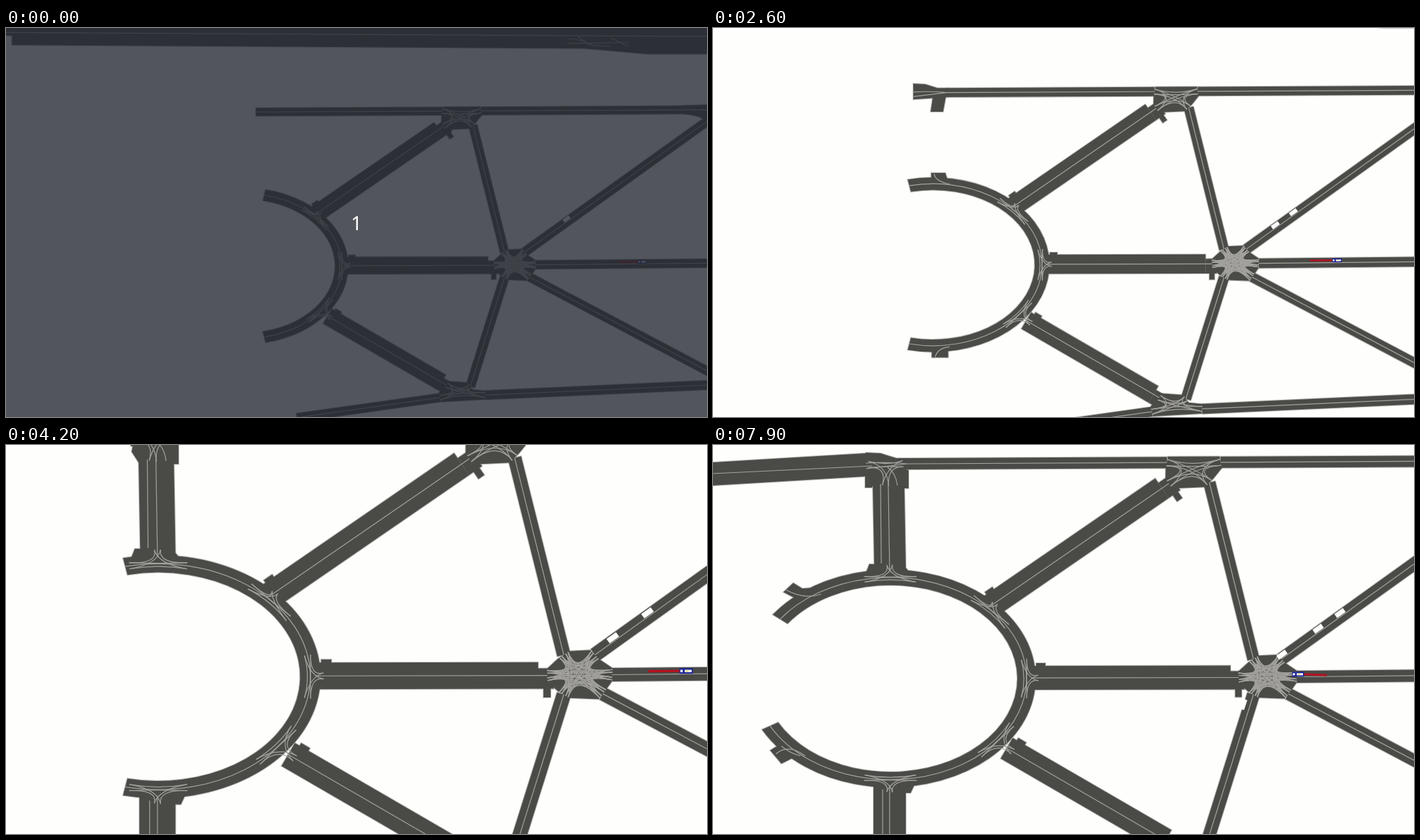
An HTML page with a canvas for the animation above (8000 ms loop, 1004 px wide and 558 px high).

```html
<!DOCTYPE html>
<html lang="en">
<head>
<meta charset="utf-8">
<title>Road map</title>
<style>
  html, body { margin: 0; width: 100%; height: 100%; overflow: hidden; background: #fefefc; }
  canvas, #veil { position: absolute; left: 0; top: 0; width: 1004px; height: 558px; }
  #veil {
    background: rgba(36, 40, 49, .79);
    color: #fff; font: 28px/558px "Noto Sans", "Open Sans", sans-serif; text-align: center;
  }
</style>
</head>
<body>
<canvas id="map"></canvas>
<div id="veil">1</div>
<script>
const W = 1004, H = 558, LOOP = 8000;
const canvas = document.getElementById('map');
const veil = document.getElementById('veil');
const ctx = canvas.getContext('2d');
const dpr = window.devicePixelRatio || 1;
canvas.width = W * dpr;
canvas.height = H * dpr;

const roads = [], lanes = [];
const road = (d, from = 0, to = LOOP) => roads.push({ p: new Path2D(d), from, to });
const lane = (d, from = 0, to = LOOP) => lanes.push({ p: new Path2D(d), from, to });
const rad = d => d * Math.PI / 180;
const passed = (times, t) => times.filter(x => x <= t).length;

// A straight axis; at(s, o) is s along it and o to its right
function axis(x1, y1, x2, y2) {
  const len = Math.hypot(x2 - x1, y2 - y1);
  const ux = (x2 - x1) / len, uy = (y2 - y1) / len;
  return { len, at: (s, o = 0) => [x1 + ux * s - uy * o, y1 + uy * s + ux * o] };
}

function strip(ax, s0, s1, o0, o1) {
  road('M' + [ax.at(s0, o0), ax.at(s1, o0), ax.at(s1, o1), ax.at(s0, o1)].join('L') + 'Z');
}

const centre = (ax, s0, s1) => lane('M' + ax.at(s0) + 'L' + ax.at(s1));

// Both kinds of road return their two mouths
function narrow(x1, y1, x2, y2, w = 17) {
  const ax = axis(x1, y1, x2, y2);
  strip(ax, 0, ax.len, -w / 2, w / 2);
  centre(ax, 0, ax.len);
  return [ax.at(0), ax.at(ax.len)];
}

// Parking strips make these wide, with a step at each end
function wide(x1, y1, x2, y2) {
  const ax = axis(x1, y1, x2, y2), n = ax.len;
  strip(ax, -20, n, -17, 17);
  strip(ax, -13, 0, -21, 0);
  strip(ax, n, n + 20, -9, 17);
  strip(ax, n + 7, n + 16, 0, 28);
  centre(ax, -20, n + 12);
  return [ax.at(-10), ax.at(n + 12)];
}

// Turning lanes from every mouth to every other one
function turns(cx, cy, mouths, from = 0, offsets = [4.5]) {
  const shift = ([x, y], o) => {
    const l = Math.hypot(x - cx, y - cy);
    return [x - (y - cy) / l * o, y + (x - cx) / l * o];
  };
  for (const o of offsets) for (const a of mouths) for (const b of mouths) {
    if (a !== b) lane(`M${shift(a, o)}Q${cx} ${cy} ${shift(b, -o)}`, from);
  }
  return shift;
}

function junction(cx, cy, mouths, offsets) {
  const shift = turns(cx, cy, mouths, 0, offsets);
  const angle = ([x, y]) => Math.atan2(y - cy, x - cx);
  const corners = [...mouths].sort((a, b) => angle(a) - angle(b))
    .flatMap(m => [shift(m, -8.5), shift(m, 8.5)]);
  road('M' + corners.join('L') + 'Z');
}

// The ring: k runs from 0 (inside) to 1 (outside)
const CX = 254, CY = 335;
const radii = k => [182 + 26 * k, 134 + 22 * k];
const onRing = (a, k = .5) =>
  [CX + radii(k)[0] * Math.cos(rad(a)), CY + radii(k)[1] * Math.sin(rad(a))];

function ring(a0, a1, k0 = 0, k1 = 1) {
  const p = new Path2D();
  p.ellipse(CX, CY, ...radii(k1), 0, rad(a0), rad(a1));
  if (k0 !== k1) {
    p.ellipse(CX, CY, ...radii(k0), 0, rad(a1), rad(a0), true);
    p.closePath();
  }
  return p;
}

const ringNode = (a, mouth, from) =>
  turns(...onRing(a), [onRing(a - 11), onRing(a + 11), mouth], from, [4]);

// Motorway at the top
road('M-233-150H1200V-89H1059L934-100-209-107V-126H-233Z');
lane('M-233-132L1200-124');
lane('M899-120Q930-118 948-107L985-104M920-124L945-107M987-121L1021-104M899-110L1024-112');

// Network
const topW = narrow(278, 27, 650, 25.2, 16), topE = narrow(727, 24.8, 1200, 22.4, 16);
const lowW = narrow(360, 638, 645, 598), lowE = narrow(735, 593, 1200, 572, 18);
const upper = wide(412, 221, 643, 62), mid = wide(476, 334, 741, 333.5), lower = wide(438, 445, 648, 567);
const north = narrow(711, 54, 774, 307), south = narrow(774, 358, 706, 575, 18);
const northE = narrow(814, 307, 1200, 30, 18);
const east = narrow(836, 332.5, 1200, 329);
const southE = narrow(824, 357, 1200, 556);
road('M1130 14L1200 12V42L1172 44Q1168 34 1130 31Z');

junction(790, 331, [mid[1], north[1], northE[0], east[0], southE[0], south[0]], [3, 6.5]);
junction(688, 32, [topW[1], topE[0], upper[1], north[0]]);
junction(688, 588, [lowW[1], lowE[0], lower[1], south[1]]);
ringNode(-42, upper[0]);
ringNode(0, mid[0]);
ringNode(38, lower[0]);

// West side, which arrives piece by piece
const THIN = 1200, STUBS = 1800, BLOCKS = 2800, AVENUE = 4300, FORK = 6200, FORK_FULL = 6500, LAST = 7500;
road('M267 484H283V500H267Z', THIN, STUBS);
road('M219 11L240 12 262 19 282 19V35L219 39Z', STUBS);
lane('M219 26Q250 24 278 27M219 34Q245 31 278 27', STUBS);
road('M254 34H277L272 61H250ZM251 171H276L281 186H251ZM252 484H281V501H252Z', STUBS, BLOCKS);
lane('M256 172Q258 186 284 191M258 500Q262 484 284 482', STUBS, BLOCKS);
road('M222 36H280V62H274L276 176 284 186H218L224 171H231L229 60 220 46Z', BLOCKS);
road('M222 484H290L283 499H276V700H230V490Z', BLOCKS);
lane('M240 56L241 170M251 56L253 180M264 58Q262 40 250 32M243 494V700M253 488V700', BLOCKS);
road('M-100 30L0 25 218 12 236 12 262 19 278 36 228 45V61H218V45L0 58-100 63Z', AVENUE);
lane('M-100 47L0 41 228 30', AVENUE);
road('M101 210L106 205 125 214 155 212 150 220 126 223Z', FORK, FORK_FULL);
lane('M105 208Q130 222 155 214', FORK);
road('M101 211L115 198 128 206 155 204 150 218 126 224Z', FORK_FULL);
road('M82 438L95 430 124 440 112 450 98 457Z', LAST);
lane('M90 443Q108 428 132 446M98 432Q110 442 125 446', LAST);
turns(250, 30, [[222, 28], [272, 27], [247, 58]], BLOCKS);
ringNode(-90, [253, 172], BLOCKS);
ringNode(90, [253, 498], BLOCKS);

const ringTop = t => [78, 102.5, 120.7, 144][passed([STUBS, AVENUE, FORK_FULL], t)];
const ringEnd = t => [78, 102.5, 128.5, 152][passed([STUBS, AVENUE, LAST], t)];
const zoom = t => 1.117 ** (passed([1700, BLOCKS, 4000, 4100], t) - 3 - passed([5000], t));

// Down the north-east road, then round the star into the south road
const approach = axis(898, 241, 798, 313), exit = axis(763, 362, 757, 380);
const BEND = 56;
function route(s) {
  if (s < approach.len) return approach.at(s);
  const u = (s - approach.len) / BEND;
  if (u > 1) return exit.at((u - 1) * BEND);
  const mix = (a, b, c) => a * (1 - u) ** 2 + 2 * b * u * (1 - u) + c * u * u;
  return [mix(798, 773, 763), mix(313, 331, 362)];
}

function drawTraffic(t) {
  ctx.fillStyle = '#fff';
  for (let k = 0; k < 4; k++) {
    if (t < 2600 * k - 500) break;
    const sec = Math.max(0, t - 2680 * k) / 1000;
    const s = 11 * sec + 1.65 * sec * sec;
    const [x, y] = route(s), [nx, ny] = route(s + 1);
    ctx.save();
    ctx.translate(x, y);
    ctx.rotate(Math.atan2(ny - y, nx - x));
    ctx.fillRect(-7.5, -3.5, 15, 7);
    ctx.restore();
  }
}

// Steady speed, then braking; the red bar follows and swings over
function drawEgo(t) {
  const sec = t / 1000;
  const x = 1049 - 28.1 * sec + 4.3 * Math.max(0, sec - 6.3) ** 2;
  const bar = -40 + 36 * Math.max(0, sec - 5.88);
  const side = 8.5 * Math.sign(bar);
  ctx.save();
  ctx.translate(x, 328 - (x - 909) * .012);
  ctx.strokeStyle = '#b5101f';
  ctx.lineWidth = 3;
  ctx.beginPath();
  ctx.moveTo(side, 0);
  ctx.lineTo(side + bar, bar > 0 ? 1.5 : .3);
  ctx.stroke();
  ctx.fillStyle = '#1c2498';
  ctx.fillRect(-8.5, -3.5, 17, 7);
  ctx.fillStyle = '#fff';
  ctx.fillRect(-7.5, -1.5, 3, 3);
  ctx.fillRect(-2, -1.5, 9, 3);
  ctx.fillStyle = '#e6dc8c';
  ctx.fillRect(0, -1.5, 3, 3);
  ctx.restore();
}

function draw(t) {
  const s = zoom(t);
  ctx.setTransform(dpr, 0, 0, dpr, 0, 0);
  ctx.fillStyle = '#fefefc';
  ctx.fillRect(0, 0, W, H);
  ctx.translate(561.5 * (1 - s), 358 * (1 - s));
  ctx.scale(s, s);

  const a0 = -ringTop(t), a1 = ringEnd(t);
  const live = r => t >= r.from && t < r.to;
  const shapes = roads.filter(live).map(r => r.p);
  shapes.push(ring(a0, a1));
  if (t >= THIN && t < STUBS) shapes.push(ring(77, 102, .45, 1));
  if (t >= FORK && t < FORK_FULL) shapes.push(ring(-144, -120, 0, .5));

  ctx.lineWidth = 2 / s;
  ctx.strokeStyle = '#b0b0ad';
  shapes.forEach(p => ctx.stroke(p));
  ctx.fillStyle = '#4a4a46';
  shapes.forEach(p => ctx.fill(p));

  ctx.lineWidth = 1.2 / s;
  ctx.strokeStyle = '#a3a29e';
  ctx.stroke(ring(a0, a1, .5, .5));
  lanes.filter(live).forEach(l => ctx.stroke(l.p));
  drawTraffic(t);
  drawEgo(t);

  veil.style.opacity = Math.max(0, 1 - t / 300);
}

// The picture advances in tenths of a second
const start = performance.now();
function frame() {
  draw(Math.floor((performance.now() - start) % LOOP / 100) * 100);
  requestAnimationFrame(frame);
}
frame();
</script>
</body>
</html>
```
